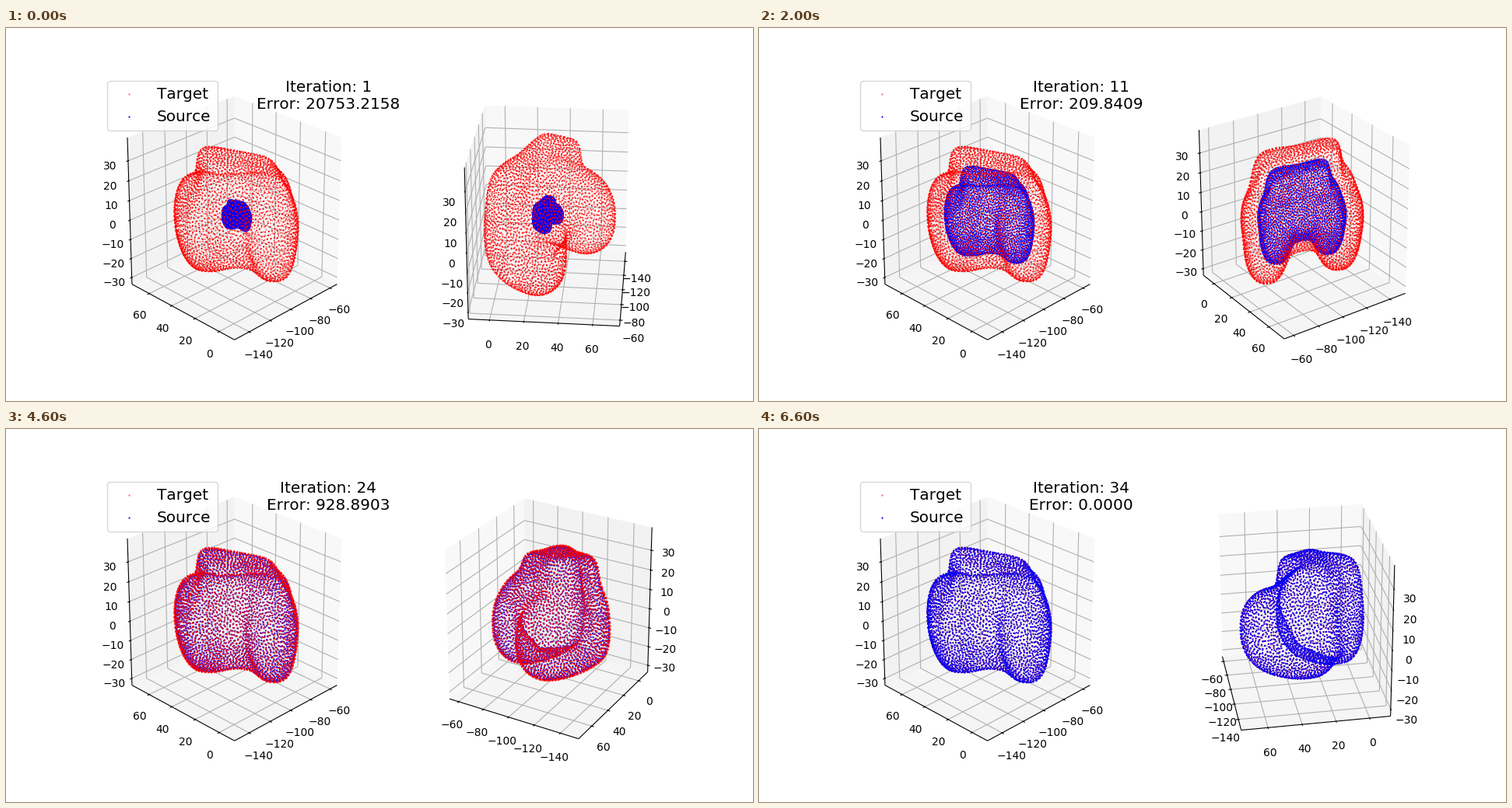
A matplotlib script for the animation above (6800 ms loop, 960 px wide and 480 px high).

```python
import numpy as np
import matplotlib.pyplot as plt
from matplotlib.animation import FuncAnimation
from matplotlib.collections import LineCollection, PolyCollection

plt.rcParams["text.kerning_factor"] = 6

STEPS = 34
ELEV = np.radians(25)
DIST = 10
EDGE = 0.5 + 1 / 48          # half width of the drawn box, in unit-cube coordinates
CENTER = (-103.1, 31.6, 3.93)
RANGE = (97.0, 84.5, 72.1)
TICKS = (range(-140, -59, 20), range(0, 61, 20), range(-30, 31, 10))
TICK_DIR = (1, 0, 0)
PANE_GREY = (0.95, 0.9, 0.925)
LABEL_GAP = 0.0902

# Bone model: centre, radii, exponent, z tilt along p and q
BONE_AXIS = np.radians(55)
BLEND = 0.027
GAP = 0.019
PARTS = (
    ((-0.15, -0.02, 0.06), (0.21, 0.315, 0.31), 6.0, 0.08, 0.22),   # shaft
    ((-0.09, 0.0, -0.02), (0.29, 0.43, 0.19), 2.5, 0.25, 0.0),      # middle
    ((0.0, 0.27, -0.07), (0.33, 0.175, 0.26), 2.4, 0.0, 0.0),       # condyles
    ((-0.04, -0.27, -0.16), (0.33, 0.17, 0.28), 2.4, 0.0, 0.0),
    ((-0.26, 0.25, -0.03), (0.13, 0.15, 0.22), 2.8, 0.0, 0.0),      # front ridges
    ((-0.27, -0.24, -0.04), (0.13, 0.14, 0.29), 3.0, 0.0, 0.0),
)

KEY_STEPS = (1, 7, 11, 16, 24, 30, 34)
KEY_SCALE = (0.23, 0.51, 0.72, 0.915, 0.985, 0.998, 1.0)
KEY_ERROR = (20753.2158, 78.5918, 209.8409, 533.4995, 928.8903, 2498.1436, 1e-6)


def field(v):
    """Smooth union of tilted superellipsoids, zero on the surface."""
    p, q, z = v.T
    total = 1e-300
    for (cp, cq, cz), (rp, rq, rz), n, tilt_p, tilt_q in PARTS:
        dz = z - cz - tilt_p * p - tilt_q * q
        m = (np.abs((p - cp) / rp) ** n + np.abs((q - cq) / rq) ** n
             + np.abs(dz / rz) ** n) ** (1 / n)
        total = total + np.exp((1 - m) * min(rp, rq, rz) / BLEND)
    return -BLEND * np.log(total)


def onto_surface(v, rounds=7, h=1e-4):
    for _ in range(rounds):
        f = field(v)
        grad = np.stack([(field(v + h * e) - f) / h for e in np.eye(3)], axis=1)
        step = f[:, None] * grad / ((grad ** 2).sum(1)[:, None] + 0.02)
        v = v - np.clip(step, -0.1, 0.1)
    return v[np.abs(field(v)) < 0.002]


def thin_out(points, gap):
    """Keep points that are at least a gap apart."""
    cells, kept = {}, []
    around = [(i, j, k) for i in (-1, 0, 1) for j in (-1, 0, 1) for k in (-1, 0, 1)]
    for x, y, z in points.tolist():
        a, b, c = int(x // gap), int(y // gap), int(z // gap)
        near = (other for i, j, k in around
                for other in cells.get((a + i, b + j, c + k), ()))
        if all((u - x) ** 2 + (v - y) ** 2 + (w - z) ** 2 >= gap * gap
               for u, v, w in near):
            cells.setdefault((a, b, c), []).append((x, y, z))
            kept.append((x, y, z))
    return np.array(kept)


def even_out(points, gap, rounds=4):
    """Push close neighbours apart along the surface."""
    reach = 1.7 * gap
    for _ in range(rounds):
        pts = points.astype(np.float32)
        norm = (pts ** 2).sum(1)
        push = np.empty_like(points)
        for i in range(0, len(pts), 500):
            part = pts[i:i + 500]
            d2 = norm[i:i + 500, None] + norm - 2 * part @ pts.T
            d = np.sqrt(np.maximum(d2, 1e-6))
            w = np.where((d > 0.004) & (d < reach), 1 / d - 1 / reach, 0)
            push[i:i + 500] = part * w.sum(1)[:, None] - w @ pts
        points = onto_surface(points + 0.25 * gap * push, rounds=2)
    return points


def make_cloud():
    rng = np.random.default_rng(3)
    seeds = onto_surface(rng.uniform(-0.5, 0.5, (34000, 3)))
    p, q, z = even_out(thin_out(seeds, GAP), GAP).T
    c, s = np.cos(BONE_AXIS), np.sin(BONE_AXIS)
    pts = np.stack([p * c - q * s, p * s + q * c, z], axis=1)
    low, high = pts.min(0), pts.max(0)
    return (pts - (low + high) / 2) / (high - low) * 0.909


def eye_vector(azim):
    a = np.radians(azim)
    return np.array([np.cos(ELEV) * np.cos(a), np.cos(ELEV) * np.sin(a), np.sin(ELEV)])


def project(pts, azim):
    """Perspective view: plane coordinates and distance from the eye."""
    pts = np.asarray(pts, float)
    a = np.radians(azim)
    right = np.array([-np.sin(a), np.cos(a), 0])
    up = np.array([-np.sin(ELEV) * np.cos(a), -np.sin(ELEV) * np.sin(a), np.cos(ELEV)])
    depth = DIST - pts @ eye_vector(azim)
    return np.stack([pts @ right, pts @ up], axis=-1) / depth[..., None], depth


def moved(point, **axes):
    out = np.array(point, float)
    for name, value in axes.items():
        out["xyz".index(name)] = value
    return out


class View:
    """One perspective box with a target and a source cloud."""

    def __init__(self, ax):
        self.ax = ax
        ax.set_xlim(-0.95 / DIST, 0.9 / DIST)
        ax.set_ylim(-0.95 / DIST, 0.9 / DIST)
        ax.axis("off")
        self.panes = ax.add_collection(PolyCollection(
            [], facecolors=[(g, g, g, 0.5) for g in PANE_GREY],
            edgecolors="none", clip_on=False, zorder=0), autolim=False)
        self.grid = self.add_lines("#b0b0b0", 1)
        self.lines = self.add_lines("black", 1.2)
        self.labels = [ax.text(0, 0, str(t).replace("-", "\u2212"), ha="center",
                               va="top", fontsize=10, zorder=1.4)
                       for ticks in TICKS for t in ticks]
        self.target = self.add_cloud("red", "Target")
        self.source = self.add_cloud("blue", "Source")

    def add_lines(self, color, zorder):
        return self.ax.add_collection(LineCollection(
            [], colors=color, linewidths=0.8, clip_on=False, zorder=zorder),
            autolim=False)

    def add_cloud(self, color, label):
        return self.ax.scatter([], [], s=2.9, marker="h", color=color, linewidths=0,
                               label=label, clip_on=False, zorder=3)

    def draw_box(self, azim):
        back = np.where(eye_vector(azim) < -1e-9, EDGE, -EDGE)
        panes, grid, lines, spots = [], [], [], []
        for i, ticks in enumerate(TICKS):
            me = "xyz"[i]
            nj, nk = [n for n in "xyz" if n != me]
            panes.append([moved(back, **{nj: u * EDGE, nk: v * EDGE})
                          for u, v in ((-1, -1), (1, -1), (1, 1), (-1, 1))])
            t = TICK_DIR[i]
            edge = back.copy()
            edge[t] *= -1
            side = np.sign(edge)
            lines.append([moved(edge, **{me: -EDGE}), moved(edge, **{me: EDGE})])
            for tick in ticks:
                at = (tick - CENTER[i]) / RANGE[i]
                base = moved(back, **{me: at})
                grid += [[base, moved(base, **{n: -back["xyz".index(n)]})]
                         for n in (nj, nk)]
                foot = moved(edge, **{me: at})
                reach = np.eye(3)[t] * side[t] / 12
                lines.append([foot - 0.1 * reach, foot + 0.2 * reach])
                spots.append(moved(edge + side * LABEL_GAP, **{me: at}))
        self.panes.set_verts(project(panes, azim)[0])
        self.grid.set_segments(project(grid, azim)[0])
        self.lines.set_segments(project(lines, azim)[0])
        for label, spot in zip(self.labels, project(spots, azim)[0]):
            label.set_position(spot)

    def draw_cloud(self, dots, pts, azim):
        xy, depth = project(pts, azim)
        is_target = dots is self.target
        fade = 0.5 if is_target else 0.1
        colors = np.zeros((len(pts), 4))
        colors[:, 0 if is_target else 2] = 1
        colors[:, 3] = 1 - fade * (depth - depth.min()) / np.ptp(depth)
        dots.set_offsets(xy)
        dots.set_facecolors(colors)

    def source_on_top(self, yes):
        self.source.set_zorder(4 if yes else 2)


cloud = make_cloud()
middle = cloud.mean(0)

fig = plt.figure(figsize=(9.6, 4.8), dpi=100, facecolor="white")
left, right = View(fig.add_subplot(121)), View(fig.add_subplot(122))
left.target.set_alpha(0.65)
legend = left.ax.legend(loc="upper left", fontsize="x-large")
legend.set_zorder(6)
left.target.set_alpha(None)
title = left.ax.text(0.87, 0.92, "", ha="center", va="center", zorder=6,
                     transform=left.ax.transAxes, fontsize="x-large")
LEFT_AZIM = 225
left.draw_box(LEFT_AZIM)
left.draw_cloud(left.target, cloud, LEFT_AZIM)


def update(frame):
    step = frame + 1
    azim = 5 * step
    error = np.exp(np.interp(step, KEY_STEPS, np.log(KEY_ERROR)))
    title.set_text(f"Iteration: {step}\nError: {error:06.4f}")
    source = middle + (cloud - middle) * np.interp(step, KEY_STEPS, KEY_SCALE)
    left.draw_cloud(left.source, source, LEFT_AZIM)
    left.source_on_top(step > 31)
    right.draw_box(azim)
    right.draw_cloud(right.target, cloud, azim)
    right.draw_cloud(right.source, source, azim)
    right.source_on_top(step > 26)


anim = FuncAnimation(fig, update, frames=STEPS, interval=200, repeat=True,
                     repeat_delay=0, cache_frame_data=False)
plt.show()
```
